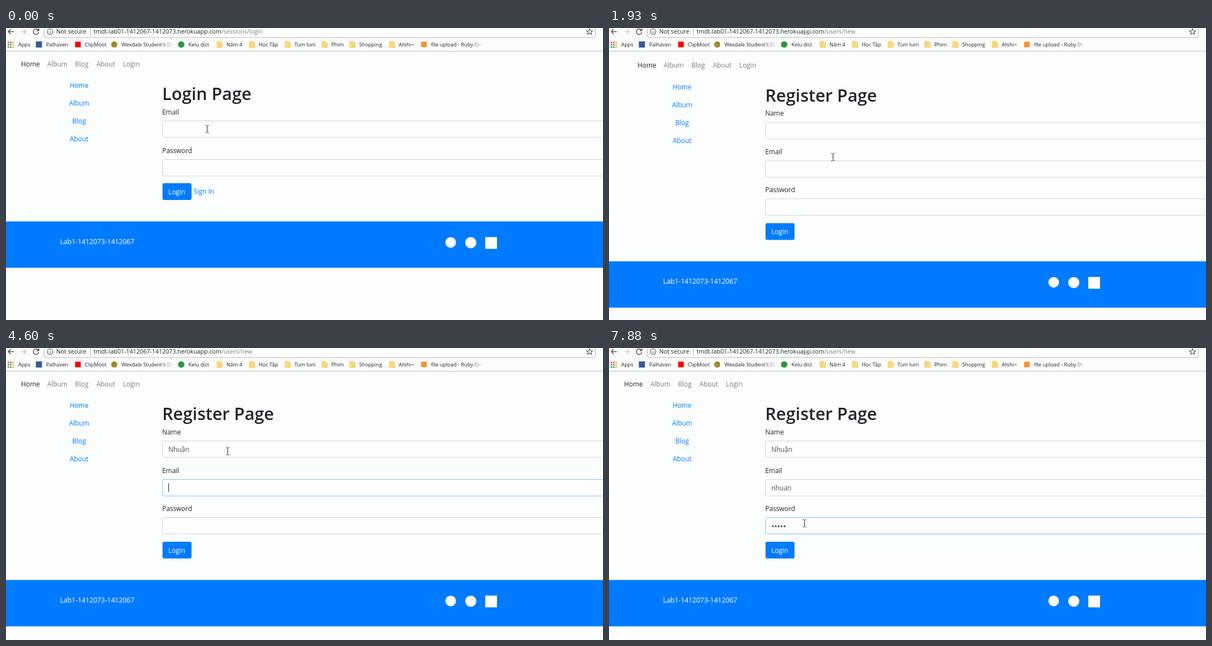
Animation of 1070x523 px, one loop 8000 ms. Source, as an HTML page:

```html
<!DOCTYPE html>
<html lang="en">
<head>
<meta charset="utf-8">
<title>Register form</title>
<style>
  html, body { margin: 0; width: 100%; height: 100%; overflow: hidden; background: #fcfdfd; }
  svg { display: block; width: 1070px; height: 523px; }
  text { font: 11.9px "Open Sans", "Noto Sans", sans-serif; fill: #212529; white-space: pre; }
  .url { font-size: 10.7px; }
  .mark { font-size: 9.3px; }
  .title { font-size: 30.7px; font-weight: 600; }
  .link { fill: #007bff; }
  .hover { fill: #0056b3; text-decoration: underline; }
  .side { text-anchor: middle; }
  .dim { fill: #7e7e7e; }
  .white { fill: #fff; }
  .value { fill: #495057; }
  .dots { font-size: 14px; }
  .line { fill: none; stroke: #555; stroke-width: 1.5; }
</style>
</head>
<body>
<svg viewBox="0 0 1070 523">
  <defs>
    <linearGradient id="fade">
      <stop offset="0" stop-color="#fcfcfc" stop-opacity="0"/>
      <stop offset=".75" stop-color="#fcfcfc"/>
    </linearGradient>
  </defs>

  <g id="bar">
    <rect width="1070" height="41" fill="#fcfcfc"/>
    <rect x="68.5" y="-8.5" width="988" height="25.5" rx="2" fill="#fdfdfd" stroke="#b8b8b8"/>
    <path class="line" d="M14 6.5H4M8.5 2L4 6.5L8.5 11"/>
    <path class="line" style="stroke:#d0d0d0" d="M26 6.5H36M31.5 2L36 6.5L31.5 11"/>
    <path class="line" d="M57.5 3.5A4.8 4.8 0 1 0 58.6 7.5"/>
    <path d="M59.5 0V5.5H54z" fill="#555"/>
    <circle class="line" style="stroke-width:1.1" cx="79" cy="6.5" r="5"/>
    <path class="line" style="stroke-width:1.2" d="M79 5.8V9.5M79 3.4V4.6"/>
    <text class="url" x="90" y="10.3">Not secure</text>
    <path d="M151.5 0V13" stroke="#aaa"/>
    <text class="url" x="157" y="10.3">tmdt-lab01-1412067-1412073.herokuapp.com<tspan id="path" class="dim"></tspan></text>
    <path class="line" style="stroke-width:1.1" d="M1046 1.2l1.5 3.6 3.9.3-3 2.5 1 3.8-3.4-2-3.4 2 1-3.8-3-2.5 3.9-.3z"/>
    <g id="marks"></g>
    <path d="M0 41.5H1070" stroke="#bdbdbd"/>
  </g>

  <g id="page">
    <g id="nav"></g>
    <g id="side"></g>
    <text id="title" class="title" x="280" y="129.3"></text>
    <g id="fields"></g>
    <g id="lower">
      <rect x="280.5" y="278" width="52" height="30" rx="3" fill="#007bff"/>
      <text class="white" x="291" y="298">Login</text>
      <text id="sign" x="336" y="296.5">Sign In</text>
      <rect y="346.5" width="1070" height="83" fill="#007bff"/>
      <text class="white" style="font-size:12.2px" x="97" y="386.5">Lab1-1412073-1412067</text>
      <g fill="#fff">
        <circle cx="797" cy="384" r="9.5"/>
        <circle cx="833" cy="384.5" r="10"/>
        <rect x="859" y="374.5" width="21" height="21"/>
      </g>
    </g>
  </g>

  <rect id="caret" width="1" height="16" fill="#222"/>

  <g id="mouse" stroke="#222">
    <path id="beam" fill="none" d="M-3 -6.5h2l1 1l1 -1h2M0 -5.5V5.5M-3 6.5h2l1 -1l1 1h2"/>
    <path id="arrow" fill="#fff" d="M0 0V13l3-3 2 4.5 2-1-2-4h4z"/>
    <path id="hand" fill="#fff" d="M-2 10V1.5a1.5 1.5 0 0 1 3 0V7l1-.5q1.5 0 2 1 2-.5 2.5 1 2 0 2 2V13q0 2-1.5 4v1.5h-7V17q-2-2-4.5-5.5-.5-1.5.5-2 1-.3 2 .5z"/>
  </g>
</svg>

<script>
const LOOP = 8000;
const REGISTER = 1930;   // register page appears
const SETTLED = 2020;    // its layout settles
const row = i => Math.round(i * 68.6);
const $ = id => document.getElementById(id);

function add(parent, tag, attrs, text) {
  const el = document.createElementNS("http://www.w3.org/2000/svg", tag);
  for (const k in attrs) el.setAttribute(k, attrs[k]);
  if (text) el.textContent = text;
  return parent.appendChild(el);
}
const label = (parent, x, y, text, cls = "") => add(parent, "text", { x, y, class: cls }, text);
const show = (el, on) => el.setAttribute("visibility", on ? "visible" : "hidden");
const move = (el, x, y) => el.setAttribute("transform", `translate(${x} ${y})`);

// Bookmarks
const marks = $("marks");
const mark = (x, text) => label(marks, x, 33, text, "mark");
const hues = ["#e5483b", "#e5483b", "#f2b51d", "#3aa757", "#4285f4", "#f2b51d", "#3aa757", "#3aa757", "#f2b51d"];
hues.forEach((fill, i) => add(marks, "rect", {
  x: 3 + i % 3 * 4.2, y: 24.5 + Math.floor(i / 3) * 4.2, width: 2.7, height: 2.7, fill
}));
mark(22, "Apps");
add(marks, "rect", { x: 53.5, y: 24, width: 11, height: 11, fill: "#3b5998" });
mark(72, "Palhaven");
add(marks, "rect", { x: 124, y: 24.5, width: 10, height: 10, fill: "#f00" });
mark(141, "ClipMoot");
add(marks, "circle", { cx: 194, cy: 29.5, r: 5.5, fill: "#a08a2c" });
mark(207, "Wexdale Student's Dicti");
add(marks, "rect", { x: 280, y: 22, width: 28, height: 16, fill: "url(#fade)" });
add(marks, "circle", { cx: 314, cy: 29.5, r: 5.8, fill: "#2c9a3f" });
mark(327, "Kelu dict");
const folders = { 395: "Năm 4", 453: "Học Tập", 517: "Tùm lum", 583: "Phim", 633: "Shopping", 704: "Ahihi~" };
for (const x in folders) {
  add(marks, "path", { d: `M${x - 17} 24h7l1 2h2v9h-10z`, fill: "#fbd978", stroke: "#e9c25b", "stroke-width": .6 });
  mark(x, folders[x]);
}
add(marks, "rect", { x: 744, y: 24.5, width: 10, height: 10, fill: "#f0943a" });
mark(762, "file upload - Ruby On");
add(marks, "rect", { x: 836, y: 22, width: 24, height: 16, fill: "url(#fade)" });

// Menus
const menu = { Home: 27, Album: 74, Blog: 123.5, About: 162, Login: 209.5 };
Object.keys(menu).forEach((name, i) => {
  label($("nav"), menu[name], 69, name, i ? "dim" : "");
  if (i < 4) label($("side"), 131, 107.2 + 32 * i, name, "link side");
});

// Form rows
const fields = [0, 1, 2].map(i => {
  const g = add($("fields"), "g", {});
  move(g, 0, row(i));
  return {
    g,
    name: label(g, 280, 155, ""),
    box: add(g, "rect", { x: 280.5, y: 166.5, width: 800, height: 29.5, rx: 3, fill: "#fdfdfd" }),
    value: label(g, 291, i == 2 ? 187.5 : 186, "", i == 2 ? "value dots" : "value")
  };
});

// Progress from 0 to 1 in n hard steps, the first at a, the last at b
function steps(t, a, b, n) {
  if (t < a) return 0;
  const gap = (b - a) / (n - 1) || 1;
  return Math.min(1, (Math.floor((t - a) / gap + .01) + 1) / n);
}

// start, end, steps, x, y
const moves = [
  [570, 1280, 9, 358, 293], [1660, 1660, 1, 362, 288], [1840, 1840, 1, 370, 283],
  [1930, 1930, 1, 401, 231], [2020, 2200, 3, 404, 182], [2290, 2370, 2, 402, 193],
  [3510, 3690, 3, 397, 185], [7700, 7880, 3, 350, 314]
];
// field, focus fade in [start, end, steps], fade out
const focus = [
  [0, [110, 390, 4], [1560, 1660, 2]],
  [0, [2370, 2550, 3], [4420, 4600, 3]],
  [1, [4420, 4600, 3], [6200, 6380, 3]],
  [2, [6200, 6380, 3], [LOOP, LOOP, 1]]
];
const caretOn = [[110, 640], [1170, 1560], [2430, 2960], [3510, 5010], [5100, 5940], [6200, 7610]];

// time, field, text
const typed = [
  [3600, 0, "N"], [3690, 0, "Nhu"], [3870, 0, "Nhua"], [3960, 0, "Nhuan"], [4140, 0, "Nhuận"]
];
for (let i = 1; i <= 5; i++) {
  typed.push([5010 + 88 * i, 1, "nhuan".slice(0, i)], [6590 + 90 * i, 2, "•".repeat(i)]);
}

function mouseAt(t) {
  let x = 360, y = 181;
  for (const [a, b, n, tx, ty] of moves) {
    const p = steps(t, a, b, n), e = p * p * (3 - 2 * p);
    x += (tx - x) * e;
    y += (ty - y) * e;
  }
  return [Math.round(x), Math.round(y)];
}

function mix(p) {
  const from = [206, 212, 218], to = [128, 189, 255];
  return `rgb(${from.map((c, i) => Math.round(c + (to[i] - c) * p))})`;
}

function draw(t) {
  const reg = t >= REGISTER, loose = reg && t < SETTLED;
  $("path").textContent = t < 1660 ? "/sessions/login" : "/users/new";
  $("title").textContent = reg ? "Register Page" : "Login Page";
  move($("page"), 0, loose ? 2.4 : 0);
  move($("nav"), loose ? 24 : 0, 0);
  move($("lower"), 0, reg ? row(1) : 0);

  const names = reg ? ["Name", "Email", "Password"] : ["Email", "Password"];
  fields.forEach((f, i) => {
    show(f.g, i < names.length);
    f.name.textContent = names[i] || "";
    const glow = focus.reduce((sum, [k, on, off]) =>
      k == i ? sum + steps(t, ...on) - steps(t, ...off) : sum, 0);
    f.box.setAttribute("stroke", mix(glow));
    const last = typed.filter(([at, k]) => k == i && at <= t).pop();
    f.value.textContent = last ? last[2] : "";
  });

  const active = t < 4420 ? 0 : t < 6200 ? 1 : 2;
  const width = fields[active].value.textContent ? fields[active].value.getComputedTextLength() : 0;
  show($("caret"), caretOn.some(([a, b]) => t >= a && t < b));
  move($("caret"), Math.round(291 + width), 173 + row(active));

  const [x, y] = mouseAt(t);
  const over = !reg && y >= 282;
  const inBox = (y > 166 && y < 197) || (y > 235 && y < 265);
  const kind = over ? "hand" : reg || inBox ? "beam" : "arrow";
  for (const id of ["beam", "arrow", "hand"]) show($(id), id == kind);
  move($("mouse"), x + .5, y);
  show($("sign"), !reg);
  $("sign").setAttribute("class", over ? "hover" : "link");
}

const start = performance.now();
function tick() {
  draw((performance.now() - start) % LOOP);
  requestAnimationFrame(tick);
}
tick();
</script>
</body>
</html>
```
